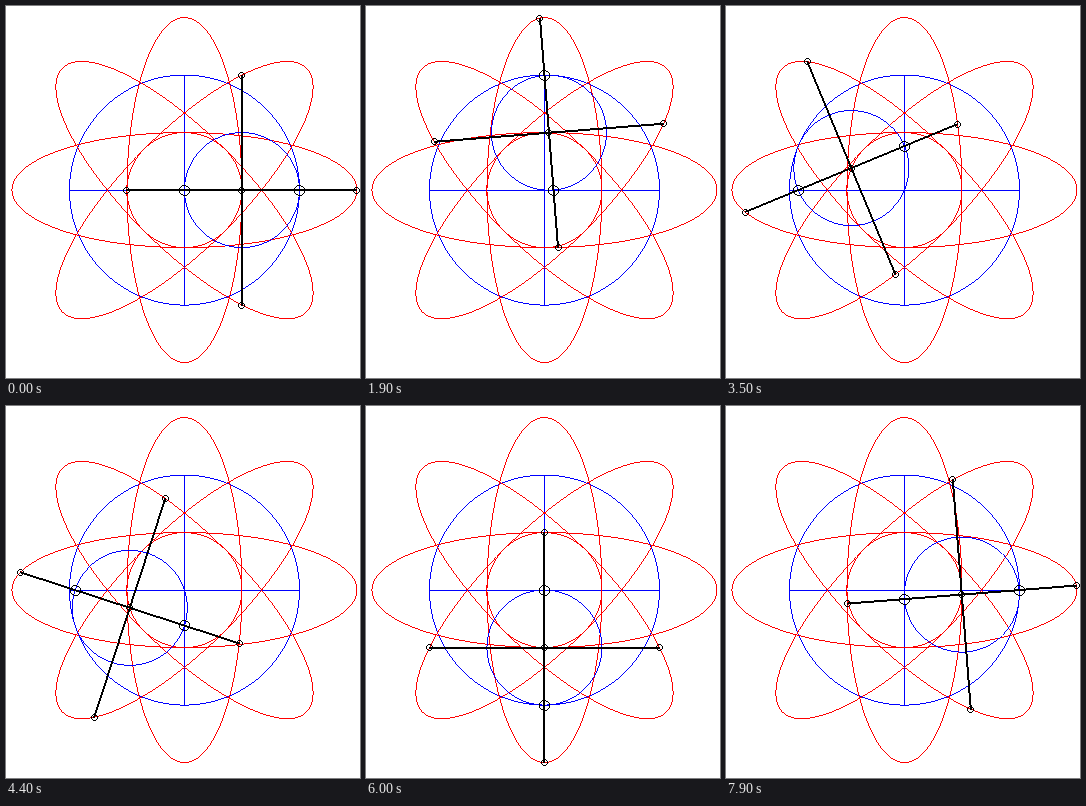
These frames come from a looping animation (354x372 px, 8 s). An HTML page with a canvas:

```html
<!DOCTYPE html>
<html lang="en">
<head>
<meta charset="utf-8">
<title>Trammel of ellipses</title>
<style>
  html, body { margin: 0; width: 100%; height: 100%; overflow: hidden; background: #fff; }
  canvas { display: block; width: 354px; height: 372px; image-rendering: pixelated; }
</style>
</head>
<body>
<canvas id="stage" width="354" height="372"></canvas>
<script>
const W = 354, H = 372;
const CX = 178.47, CY = 184.07;
const R = 115, r = R / 2;
const STEPS = 80, STEP_MS = 100;
const BLUE = '#00f', RED = '#f00', BLACK = '#000';

const stage = document.getElementById('stage').getContext('2d');
const backdrop = document.createElement('canvas');
backdrop.width = W;
backdrop.height = H;

// One-pixel ellipse without smoothing: a dot wherever the curve
// passes a pixel centre along its main direction.
function ellipse(g, color, cx, cy, a, b = a, tilt = 0) {
  const n = Math.ceil(Math.max(a, b) * 26);
  const c = Math.cos(tilt), s = Math.sin(tilt);
  const point = i => {
    const t = i / n * 2 * Math.PI;
    const u = a * Math.cos(t), v = b * Math.sin(t);
    return [cx + u * c - v * s, cy + u * s + v * c];
  };
  g.fillStyle = color;
  let [px, py] = point(0);
  for (let i = 1; i <= n; i++) {
    const [x, y] = point(i);
    const kx = Math.round(x), ky = Math.round(y);
    const qx = Math.round(px), qy = Math.round(py);
    if (Math.abs(x - px) >= Math.abs(y - py)) {
      if (kx !== qx) g.fillRect(Math.max(kx, qx) - 1, Math.floor(y), 1, 1);
    } else if (ky !== qy) {
      g.fillRect(Math.floor(x), Math.max(ky, qy) - 1, 1, 1);
    }
    px = x;
    py = y;
  }
}

// Bar two pixels thick, measured across its main axis.
function bar(g, [x0, y0], [x1, y1]) {
  const dx = x1 - x0, dy = y1 - y0;
  g.fillStyle = BLACK;
  if (Math.abs(dx) > Math.abs(dy)) {
    for (let x = Math.floor(Math.min(x0, x1)); x <= Math.max(x0, x1); x++) {
      const y = y0 + (x + 0.5 - x0) * dy / dx;
      g.fillRect(x, Math.round(y) - 1, 1, 2);
    }
  } else {
    for (let y = Math.floor(Math.min(y0, y1)); y <= Math.max(y0, y1); y++) {
      const x = x0 + (y + 0.5 - y0) * dx / dy;
      g.fillRect(Math.round(x) - 1, y, 2, 1);
    }
  }
}

function ring(g, [x, y], size) {
  ellipse(g, BLACK, Math.floor(x) + 0.5, Math.floor(y) + 0.5, size);
}

function drawBackdrop(g) {
  g.fillStyle = '#fff';
  g.fillRect(0, 0, W, H);
  g.fillStyle = BLUE;
  g.fillRect(63, 184, 231, 1);
  g.fillRect(178, 69, 1, 231);
  ellipse(g, BLUE, CX, CY, R);
  ellipse(g, RED, CX, CY, r);
  for (let i = 0; i < 4; i++) ellipse(g, RED, CX, CY, 3 * r, r, i * Math.PI / 4);
}

function draw(step) {
  const angle = step / STEPS * 2 * Math.PI;
  const c = Math.cos(angle), s = Math.sin(angle);
  const mx = CX + r * c, my = CY - r * s;

  const rod = [[mx - R * c, my - R * s], [mx + R * c, my + R * s]];
  const cross = [[mx - R * s, my + R * c], [mx + R * s, my - R * c]];
  const sliders = [[CX + R * c, CY], [CX, CY - R * s]];

  stage.drawImage(backdrop, 0, 0);
  ellipse(stage, BLUE, mx, my, r);
  bar(stage, ...rod);
  bar(stage, ...cross);
  for (const p of [...rod, ...cross, [mx, my]]) ring(stage, p, 3);
  for (const p of sliders) ring(stage, p, 5);
}

let shown = -1;
function tick() {
  const step = Math.floor(performance.now() / STEP_MS) % STEPS;
  if (step !== shown) draw(shown = step);
  requestAnimationFrame(tick);
}

drawBackdrop(backdrop.getContext('2d'));
tick();
</script>
</body>
</html>
```
